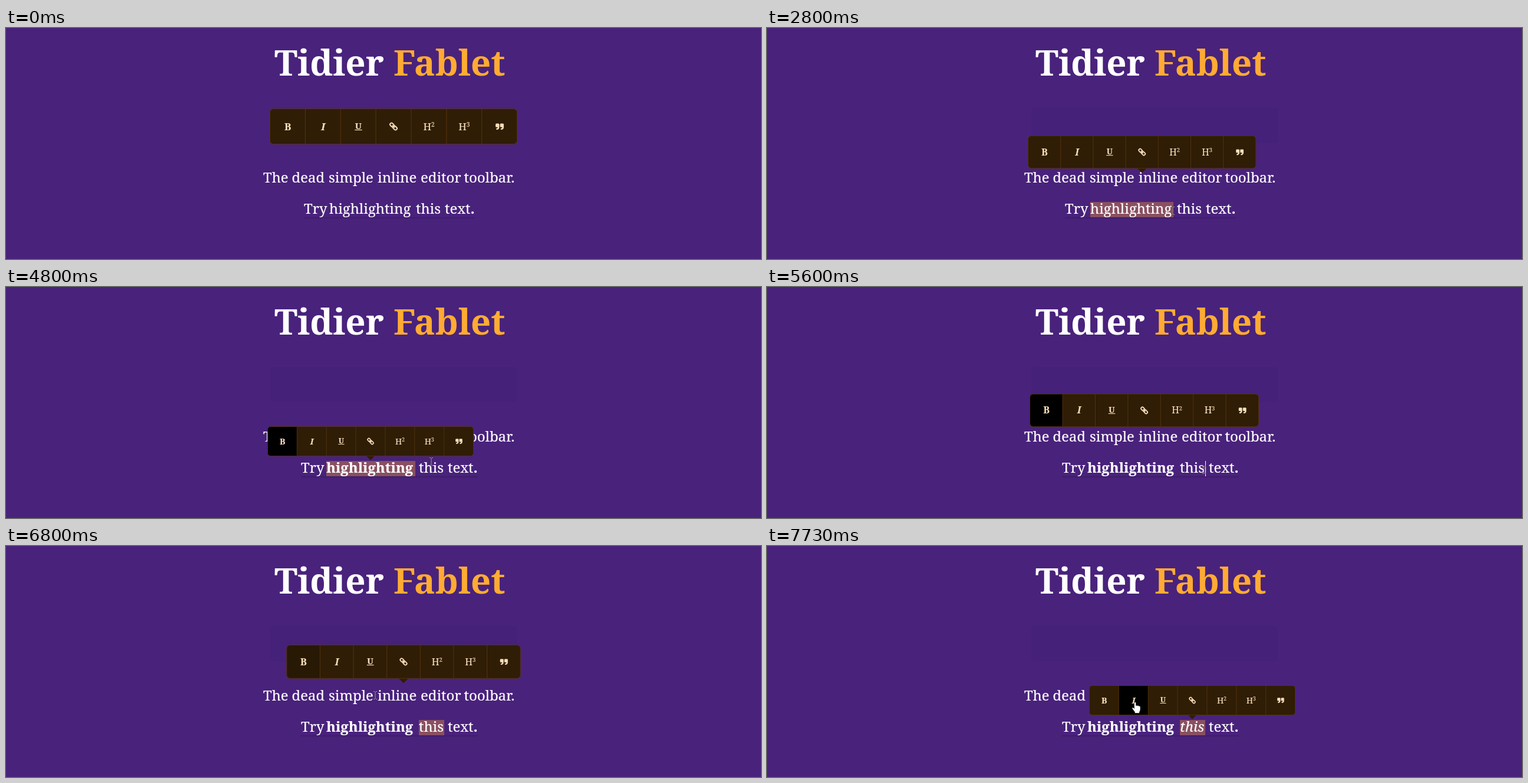
An HTML page for the animation above (8 s loop, 1280 by 393 pixels).

```html
<!DOCTYPE html>
<html lang="en">
<head>
<meta charset="utf-8">
<title>Inline toolbar</title>
<style>
  html, body { margin: 0; width: 100%; height: 100%; overflow: hidden; background: #49227c; }
  svg { display: block; width: 1280px; height: 393px; font-family: "Noto Serif", serif; }
  .title { font-size: 60px; font-weight: 700; }
  .copy { font-size: 23.9px; font-weight: 500; fill: #fff; stroke: #fff; stroke-width: .2; }
  .icons { fill: #f8dfba; font-size: 17px; font-weight: 500; text-anchor: middle; }
  .icons text { stroke: #f8dfba; stroke-width: .2; }
  .edge { fill: none; stroke: #57350f; }
</style>
</head>
<body>
<svg viewBox="0 0 1280 393">
  <defs>
    <clipPath id="round"><rect x="-209.5" y="-30" width="419" height="60" rx="6"/></clipPath>
    <path id="quote" d="M0 1.5Q0 0 1.5 0H4.8Q6.3 0 6.3 1.5V6Q6.3 10.5 1.8 10.5H1.2V8.3H1.8Q3.7 8.3 3.7 6.3H1.5Q0 6.3 0 4.8Z"/>
  </defs>
  <rect width="1280" height="393" fill="#49227c"/>
  <g class="title">
    <text x="455" y="81" fill="#fff">Tidier</text>
    <text x="657" y="81" fill="#ffab33">Fablet</text>
  </g>
  <rect id="slot" x="447.5" y="136" width="419" height="60" rx="6" fill="#452179"/>
  <rect id="selection" y="296" height="26" fill="#ffa52f" fill-opacity=".35"/>
  <path id="underline" stroke="#3b1c65" stroke-width="1.3"/>
  <g id="copy" class="copy"></g>
  <path id="caret" d="M743.5 296V322" stroke="#fff"/>

  <g id="toolbar">
    <path id="arrow" d="M-9 29.5H9L0 38.5Z" fill="#2f1d05"/>
    <g clip-path="url(#round)">
      <rect x="-210" y="-31" width="420" height="62" fill="#2f1d05"/>
      <rect id="boldCell" x="-209.5" y="-30" width="59.86" height="60"/>
      <rect id="italicCell" x="-149.64" y="-30" width="59.86" height="60"/>
    </g>
    <path id="dividers" class="edge"/>
    <rect class="edge" x="-209.5" y="-30" width="419" height="60" rx="6"/>
    <g class="icons">
      <text x="-179.2" y="6" font-weight="700">B</text>
      <text x="-119.4" y="6" font-weight="700" font-style="italic">I</text>
      <text x="-59.6" y="4" font-weight="700" font-size="15">U</text>
      <rect x="-65.7" y="5.4" width="12.4" height="1.2"/>
      <g transform="rotate(45)" fill="none" stroke="#f8dfba" stroke-width="1.9">
        <rect x="-7.3" y="-2.5" width="7.4" height="5" rx="2.3"/>
        <rect x="-.1" y="-2.5" width="7.4" height="5" rx="2.3"/>
        <path d="M-3 0H3"/>
      </g>
      <text x="60" y="6">H<tspan dy="-6" font-size="10">2</tspan></text>
      <text x="119.8" y="6">H<tspan dy="-6" font-size="10">3</tspan></text>
      <use href="#quote" x="173" y="-5"/>
      <use href="#quote" x="180.6" y="-5"/>
    </g>
  </g>

  <g id="cursor">
    <path id="pointer" d="M0 0V16L3.7 12.6 6.3 18.4 8.8 17.3 6.3 11.7H11.3Z" fill="#fff" stroke="#111" stroke-width=".8"/>
    <g id="beam" fill="none">
      <path d="M-3 -6.5H-1L0 -5.5 1 -6.5H3M0 -5.5V5.5M-3 6.5H-1L0 5.5 1 6.5H3" stroke="#2b1746" stroke-width="2" opacity=".6"/>
      <path d="M-3 -6.5H-1L0 -5.5 1 -6.5H3M0 -5.5V5.5M-3 6.5H-1L0 5.5 1 6.5H3" stroke="#bdb695" stroke-width=".9"/>
    </g>
    <path id="hand" fill="#fff" stroke="#111" stroke-width=".7" stroke-linejoin="round"
      d="M-1.5 1Q0 -1 1.6 1V6Q3 4.7 4 6.2 5.6 5 6.4 6.8 8.8 6 9 8.6V12.5Q9 15 7.4 17V19H-.5V17L-4.8 11.3Q-5.3 9 -3.2 9.2L-1.5 11Z"/>
  </g>
</svg>
<script>
const LOOP = 8000, STEP = 1000 / 15, MOVE = 500;
const $ = id => document.getElementById(id);
const clamp = (v, lo = 0, hi = 1) => Math.min(hi, Math.max(lo, v));
const smooth = v => (v = clamp(v), v * v * (3 - 2 * v));
const mix = (a, b, p) => a.map((v, i) => v + (b[i] - v) * p);
const show = (id, on) => $(id).style.display = on ? '' : 'none';

function addWord(content, x, y) {
  const word = document.createElementNS('http://www.w3.org/2000/svg', 'text');
  word.innerHTML = content;
  word.setAttribute('x', x);
  word.setAttribute('y', y);
  $('copy').append(word);
  return word;
}

[['The', 436], ['dead', 484.5], ['simple', 547], ['inline', 630], ['editor', 703], ['toolbar.', 776.5]]
  .forEach(([content, x]) => addWord(content, x, 263));

// Second line: word positions before and after the bold command.
const fullStop = '<tspan font-weight="800">.</tspan>';
const line = [['Try', 505, 500], ['highlighting', 548, 543], ['this', 695, 700], ['text' + fullStop, 744, 749]]
  .map(([content, plain, bold]) => ({ node: addWord(content, plain, 316), plain, bold }));

$('dividers').setAttribute('d', [1, 2, 3, 4, 5, 6].map(i => `M${-209.5 + i * 59.86} -30V30`).join(''));

// Toolbar centre and scale
const HOME = [657, 167.5, 1], LIFTED = [651.5, 165.5, 1];
const OVER_FIRST = [618, 262.5, .833], OVER_SECOND = [721, 262.5, .833];
const RISE = 2560, RETURN = 5332, RISE_AGAIN = 6610;
const BOLD = 4330, CLICK = 5130, DRAG = 5640, ITALIC = 7660;

function toolbarPose(t) {
  const travel = (from, to, start) => mix(from, to, smooth((t - start) / MOVE));
  if (t < RISE) return HOME;
  if (t < RETURN) return travel(LIFTED, OVER_FIRST, RISE);
  if (t < RISE_AGAIN) return travel(OVER_FIRST, HOME, RETURN);
  return travel(LIFTED, OVER_SECOND, RISE_AGAIN);
}

// time, x, y
const path = [
  [420, 800, 368], [870, 509, 295], [1130, 548, 309], [1420, 548, 309], [1860, 696, 312],
  [2100, 696, 312], [2330, 688, 311], [3400, 688, 311], [4200, 473, 264], [4560, 473, 264],
  [4800, 721, 297], [4950, 721, 297], [5080, 741, 311], [5610, 741, 311], [6000, 710, 311],
  [6220, 710, 311], [6330, 700, 311], [6620, 700, 311], [6800, 626, 254], [7450, 622, 263],
  [7600, 624, 265.5], [LOOP, 624, 265.5]
];

function cursorAt(t) {
  const next = Math.max(1, path.findIndex(k => k[0] > t));
  const a = path[next - 1], b = path[next];
  return mix(a, b, smooth((t - a[0]) / (b[0] - a[0]))).slice(1);
}

function selectionAt(t, x) {
  if (t < 1440) return [0, 0];
  if (t < 2300) return [548, x > 692 ? 695 : clamp(x, 548, 689)];
  if (t < BOLD) return [548, 689];
  if (t < CLICK) return [543, 694];
  if (t < DRAG) return [0, 0];
  return [t < 6320 ? clamp(x, 700, 743) : 700, 743];
}

function draw(t) {
  const [x, y] = cursorAt(t), [cx, cy, scale] = toolbarPose(t);
  const bold = t >= BOLD;

  line.forEach(w => w.node.setAttribute('x', bold ? w.bold : w.plain));
  line[1].node.setAttribute('font-weight', bold ? 800 : 500);
  line[2].node.setAttribute('font-style', t >= ITALIC ? 'italic' : 'normal');
  $('underline').setAttribute('d', bold ? 'M500 323H800' : 'M505 323H795');

  const [left, right] = selectionAt(t, x);
  $('selection').setAttribute('x', left);
  $('selection').setAttribute('width', right - left);
  show('caret', t >= CLICK && t < DRAG);

  $('toolbar').setAttribute('transform', `translate(${cx} ${cy}) scale(${scale})`);
  show('slot', t >= RISE);
  show('arrow', t >= RISE && t < RETURN || t >= RISE_AGAIN);
  $('boldCell').setAttribute('opacity', smooth((t - 4120) / 200) - smooth((t - RISE_AGAIN) / 250));
  $('italicCell').setAttribute('opacity', smooth((t - 7200) / 200));

  const onToolbar = Math.abs(x - cx) < 209.5 * scale && Math.abs(y - cy) < 30 * scale;
  show('cursor', t >= 466);
  show('hand', onToolbar);
  show('pointer', !onToolbar && y > 328);
  show('beam', !onToolbar && y <= 328);
  $('cursor').setAttribute('transform', `translate(${x} ${y})`);
}

function tick() {
  const t = performance.now() % LOOP;
  draw(Math.floor(t / STEP + .01) * STEP);
  requestAnimationFrame(tick);
}
tick();
</script>
</body>
</html>
```
